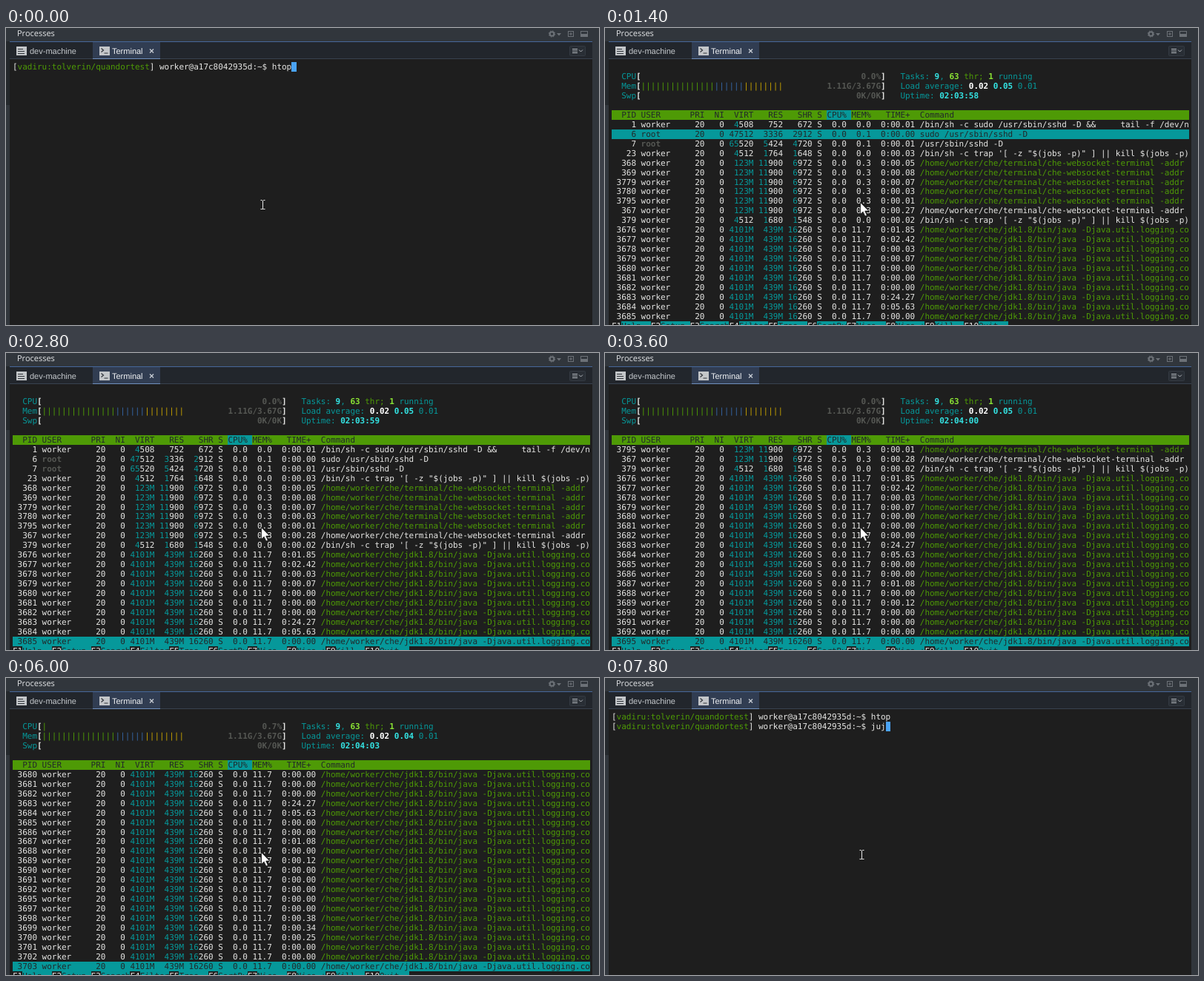
Animation of 800x401 px, one loop 8 s. Source, as an HTML page:

```html
<!DOCTYPE html>
<html lang="en">
<head>
<meta charset="utf-8">
<title>Terminal</title>
<style>
  html, body { margin: 0; width: 100%; height: 100%; overflow: hidden; background: #31363c; }
  #stage { position: absolute; left: 0; top: 0; width: 800px; height: 401px; overflow: hidden; }
  svg { position: absolute; left: 0; top: 0; }
  .ui { font: 11px "Liberation Sans", Arial, sans-serif; fill: #c4c8cc; text-rendering: geometricPrecision; }
  #screen span {
    position: absolute; height: 13px; white-space: pre;
    font: 11px/13px "DejaVu Sans Mono", monospace;
    letter-spacing: -.022px; text-rendering: geometricPrecision;
  }
</style>
</head>
<body>
<div id="stage">
  <svg width="800" height="401" shape-rendering="crispEdges">
    <rect width="800" height="401" fill="#31363c"/>
    <rect y="18" width="5" height="86" fill="#24282c"/>
    <rect x="5" y="18" width="786" height="25" fill="#22262c"/>
    <rect x="5" y="18" width="786" height="1" fill="#46679a"/>
    <rect x="117" y="19" width="91" height="23" fill="#313d52"/>
    <rect x="5" y="41" width="786" height="1" fill="#39424f"/>
    <rect x="117" y="41" width="91" height="1" fill="#6f8fbd"/>
    <rect x="5" y="42" width="786" height="359" fill="#1e1e1e"/>
    <rect x="14" y="25" width="14" height="12" rx="1" fill="#c3c6c9"/>
    <path d="M16 28.5h7M16 31.5h9M16 34.5h9" stroke="#30343a"/>
    <rect x="126" y="25" width="14" height="12" rx="1" fill="#c3c6c9"/>
    <g shape-rendering="auto" fill="none">
      <path d="M128.5 27.5l3 2.5-3 2.5M132.500 34h5" stroke="#30343a" stroke-width="1.2"/>
      <path d="M194 28.500l5 5m0-5l-5 5" stroke="#c9ced6" stroke-width="1.300"/>
      <circle cx="736.5" cy="8" r="2.800" stroke="#6c7177" stroke-width="2"/>
      <circle cx="736.5" cy="8" r="4.200" stroke="#6c7177" stroke-dasharray="1.65"/>
      <path d="M743 7h6l-3 3.500z" fill="#6c7177"/>
      <rect x="758.500" y="4.500" width="7" height="7" stroke="#6c7177"/>
      <path d="M760 8h4m-2-2v4" stroke="#6c7177"/>
      <rect x="775.500" y="4.500" width="9" height="7" stroke="#6c7177"/>
      <path d="M776 9.500h8" stroke="#6c7177" stroke-width="3"/>
      <rect x="760.500" y="24.500" width="21" height="13" rx="1" fill="#292e35" stroke="#343a42"/>
      <path d="M764 28.500h7M764 31h7M764 33.500h7M773 29.500l2.500 2.500 2.500-2.500" stroke="#b4b9be"/>
    </g>
    <text class="ui" x="15" y="11" style="font-family:'Open Sans',sans-serif;fill:#e4e6e8">Processes</text>
    <text class="ui" x="32" y="35">dev-machine</text>
    <text class="ui" x="143" y="35" style="fill:#f2f4f6">Terminal</text>
  </svg>
  <div id="screen"></div>
  <svg width="800" height="401">
    <path id="beam" d="M343.500 232.500h2l1 1 1-1h2M346.500 233v12M343.500 244.500h2l1-1 1 1h2" fill="none" stroke="#e8e8e8"/>
    <path id="arrow" d="M344.500 235.500v16l3.700-3.400 2.600 6 2.600-1.100-2.600-5.900h5z" fill="#fff" stroke="#111" stroke-width=".8"/>
  </svg>
</div>
<script>
const LOOP = 8000, CELL = 6.6, LINE = 12.96, LEFT = 9, TOP = 46, COLS = 118, ROWS = 21;
const FG = '#e6e6e4', DARK = '#22282a', DIM = '#555753', CYAN = '#06989a', AQUA = '#34e2e2',
      GREEN = '#4e9a06', LIME = '#8ae234', BLUE = '#3465a4', YELLOW = '#c4a000', CURSOR = '#4aa3f5';
const USER = 'worker', HOST = 'a17c8042935d', SPACE = 'vadiru:tolverin/quandortest';

const HOME = `/home/${USER}/che`;
const SOCKET = HOME + '/terminal/che-websocket-terminal -addr';
const JAVA = HOME + '/jdk1.8/bin/java -Djava.util.logging.co';
const TRAP = `/bin/sh -c trap '[ -z "$(jobs -p)" ] || kill $(jobs -p)`;

const proc = (pid, virt, res, shr, mem, time, cmd, more) =>
  ({ pid, virt, res, shr, mem, time, cmd, user: USER, color: FG, ...more });
const socket = (pid, time, color = GREEN) =>
  proc(pid, '123M', '11900', '6972', '0.3', time, SOCKET, { color });

const javaTimes = { 3676: '0:01.85', 3677: '0:02.42', 3678: '0:00.03', 3679: '0:00.07', 3683: '0:24.27',
  3684: '0:05.63', 3687: '0:01.08', 3689: '0:00.12', 3698: '0:00.38', 3699: '0:00.34', 3700: '0:00.25' };
const javaPids = Array.from({ length: 28 }, (_, i) => 3676 + i).filter(p => ![3693, 3694, 3696].includes(p));

const procs = [
  proc(1, '4508', '752', '672', '0.0', '0:00.01', '/bin/sh -c sudo /usr/sbin/sshd -D &&     tail -f /dev/n'),
  proc(6, '47512', '3336', '2912', '0.1', '0:00.00', 'sudo /usr/sbin/sshd -D', { user: 'root' }),
  proc(7, '65520', '5424', '4720', '0.1', '0:00.01', '/usr/sbin/sshd -D', { user: 'root' }),
  proc(23, '4512', '1764', '1648', '0.0', '0:00.03', TRAP),
  socket(368, '0:00.05'), socket(369, '0:00.08'), socket(3779, '0:00.07'),
  socket(3780, '0:00.03'), socket(3795, '0:00.01'), socket(367, '0:00.27', FG),
  proc(379, '4512', '1680', '1548', '0.0', '0:00.02', TRAP),
  ...javaPids.map(p => proc(p, '4101M', '439M', '16260', '11.7', javaTimes[p] || '0:00.00', JAVA, { color: GREEN }))
];

// htop: selected row, first row shown, uptime, cpu; shell: lines typed and the cursor cell
const top_ = (sel, first, up, cpu = '0.0%', load = '0.05') => ({ sel, first, up, cpu, load });
const shell = (typed, cursor) => ({ typed, cursor });
const steps = [
  [0, shell(['htop'], [0, 57])],
  [400, {}],
  [600, top_(0, 0, '02:03:57')],
  [1400, top_(1, 0, '02:03:58')],
  [1800, top_(2, 0, '02:03:58')],
  [2400, top_(7, 0, '02:03:59')],
  [2600, top_(12, 0, '02:03:59')],
  [2800, top_(20, 0, '02:03:59')],
  [3000, top_(23, 3, '02:04:00')],
  [3400, top_(26, 6, '02:04:00')],
  [3600, top_(28, 8, '02:04:00')],
  [4000, top_(30, 10, '02:04:01', '1.3%', '0.04')],
  [4200, top_(31, 11, '02:04:01', '1.3%', '0.04')],
  [4400, top_(32, 12, '02:04:01', '1.3%', '0.04')],
  [4600, top_(33, 13, '02:04:01', '1.3%', '0.04')],
  [5000, top_(35, 15, '02:04:02', '0.0%', '0.04')],
  [6000, top_(35, 15, '02:04:03', '0.7%', '0.04')],
  [6400, shell(['htop'], [1, 0])],
  [6600, shell(['htop', ''], [1, 53])],
  [7600, shell(['htop', 'ju'], [1, 55])],
  [7800, shell(['htop', 'juj'], [1, 56])]
];

const byId = id => document.getElementById(id);
const screen_ = byId('screen');

function put(row, col, text, color = FG, bold = false) {
  const s = document.createElement('span');
  s.textContent = text;
  s.style.left = LEFT + col * CELL + 'px';
  s.style.top = Math.round(TOP + row * LINE) + 'px';
  s.style.color = color;
  if (bold) s.style.fontWeight = 'bold';
  screen_.append(s);
  return s;
}

function fill(row, col, count, color) {
  const s = put(row, col, '');
  s.style.width = count * CELL + 'px';
  s.style.background = color;
}

// Writes [text, color, bold] pieces one after another
function line(row, col, ...parts) {
  for (const [text, color, bold] of parts) {
    put(row, col, text, color, bold);
    col += text.length;
  }
}

function prompt_(row, typed) {
  line(row, 0, ['['], [SPACE, GREEN], ['] '], [`${USER}@${HOST}:~$ ${typed}`]);
}

function meter(row, name, value, ...bars) {
  line(row, 2, [name, CYAN], ['[', FG, true], ...bars);
  put(row, 55 - value.length, value, DIM, true);
  put(row, 55, ']', FG, true);
}

// Right-aligned size; thousands and megabytes are tinted
function size(row, end, text, selected) {
  const cut = text.endsWith('M') ? text.length : Math.max(0, text.length - 3);
  line(row, end - text.length, [text.slice(0, cut), selected ? DARK : CYAN], [text.slice(cut), selected ? DARK : FG]);
}

function processRow(row, p, selected, busy) {
  const fg = selected ? DARK : FG;
  const live = busy && p.pid === 367;
  if (selected) fill(row, 0, COLS, CYAN);
  put(row, 0, String(p.pid).padStart(5), fg);
  put(row, 6, p.user, p.user === 'root' && !selected ? DIM : fg, p.user === 'root' && !selected);
  put(row, 17, '20   0', fg);
  size(row, 29, p.virt, selected);
  size(row, 35, p.res, selected);
  size(row, 41, p.shr, selected);
  put(row, 42, `S  ${live ? '0.5' : '0.0'} ${p.mem.padStart(4)}  ${live ? '0:00.28' : p.time}`, fg);
  put(row, 63, p.cmd, selected ? DARK : p.color);
}

function drawTop({ sel, first, up, cpu, load }) {
  meter(1, 'CPU', cpu, [cpu === '0.0%' ? '' : '|', GREEN]);
  meter(2, 'Mem', '1.11G/3.67G', ['|'.repeat(15), GREEN], ['|'.repeat(6), BLUE], ['|'.repeat(8), YELLOW]);
  meter(3, 'Swp', '0K/0K');
  line(1, 59, ['Tasks: ', CYAN], ['9', AQUA, true], [', ', CYAN], ['63', LIME, true],
    [' thr; ', GREEN], ['1', LIME, true], [' running', CYAN]);
  line(2, 59, ['Load average: ', CYAN], ['0.02 ', '#fff', true], [load + ' ', AQUA, true], ['0.01', CYAN]);
  line(3, 59, ['Uptime: ', CYAN], [up, AQUA, true]);

  fill(5, 0, COLS, GREEN);
  fill(5, 44, 5, CYAN);
  put(5, 0, '  PID USER      PRI  NI  VIRT   RES   SHR S CPU% MEM%   TIME+  Command', DARK);
  procs.slice(first, first + ROWS).forEach((p, i) =>
    processRow(6 + i, p, first + i === sel, up > '02:03:58'));

  ['Help', 'Setup', 'Search', 'Filter', 'Tree', 'SortBy', 'Nice -', 'Nice +', 'Kill', 'Quit'].forEach((name, i) => {
    const key = 'F' + (i + 1);
    put(27, i * 8, key);
    fill(27, i * 8 + key.length, 6, CYAN);
    put(27, i * 8 + key.length, name, DARK);
  });
}

function draw(state) {
  screen_.replaceChildren();
  const inShell = !!state.typed;
  byId('beam').style.display = inShell ? '' : 'none';
  byId('arrow').style.display = inShell ? 'none' : '';
  if (inShell) {
    state.typed.forEach((text, row) => prompt_(row, text));
    fill(...state.cursor, 1, CURSOR);
  } else if (state.up) {
    drawTop(state);
  }
}

let shown = null;
function tick() {
  const t = performance.now() % LOOP;
  const state = steps.findLast(([at]) => at <= t)[1];
  if (state !== shown) draw(shown = state);
  requestAnimationFrame(tick);
}
tick();
</script>
</body>
</html>
```
